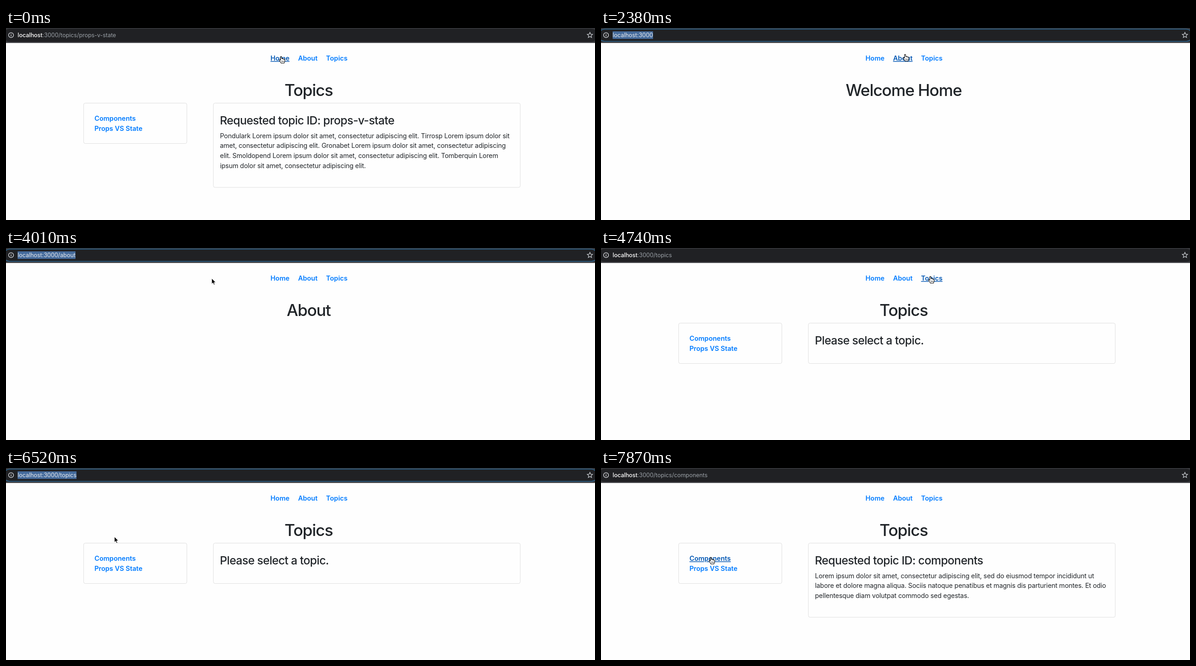
Write an HTML page that moves like this. It is 1280 px wide and 418 px high and loops after 8 s.

```html
<!DOCTYPE html>
<html lang="en">
<head>
<meta charset="utf-8">
<title>Router demo</title>
<style>
  html, body { margin: 0; width: 100%; height: 100%; overflow: hidden; background: #fefefe; }
  svg { display: block; width: 100%; height: 100%; }
  text { font-family: Inter, "Open Sans", sans-serif; font-optical-sizing: none; fill: #212529; white-space: pre; }
  .url { font-size: 12.5px; letter-spacing: -.04px; fill: #9aa0a6; }
  .url .host { font-weight: 500; fill: #fff; }
  .focused .url, .focused .host { font-weight: 400; fill: #e8eaed; }
  .link { font-size: 14.5px; font-weight: 600; fill: #007bff; }
  .link.hover { fill: #0056b3; text-decoration: underline; }
  .title { font-size: 35.2px; font-weight: 500; letter-spacing: -1.1px; text-anchor: middle; }
  .heading { font-size: 24.7px; font-weight: 500; letter-spacing: -.6px; }
  .body { font-size: 14.2px; letter-spacing: -.14px; }
  .card { fill: none; stroke: #dfdfdf; }
</style>
</head>
<body>
<svg id="stage" viewBox="0 0 1280 418" preserveAspectRatio="none"></svg>
<script>
const LOOP = 8000, STEP = 148.3;
const stage = document.getElementById('stage');

const lorem = 'Lorem ipsum dolor sit amet, consectetur adipiscing elit.';
const pages = {
  home: { path: '', title: 'Welcome Home' },
  about: { path: '/about', title: 'About' },
  topics: { path: '/topics', title: 'Topics', heading: 'Please select a topic.', bottom: 251.5 },
  props: {
    path: '/topics/props-v-state', title: 'Topics', heading: 'Requested topic ID: props-v-state', bottom: 347,
    lines: [
      `Pondulark ${lorem} Tirrosp Lorem ipsum dolor sit`,
      `amet, consectetur adipiscing elit. Gronabet Lorem ipsum dolor sit amet, consectetur adipiscing`,
      `elit. Smoldopend ${lorem} Tomberquin Lorem`,
      'ipsum dolor sit amet, consectetur adipiscing elit.'
    ]
  },
  components: {
    path: '/topics/components', title: 'Topics', heading: 'Requested topic ID: components', bottom: 325,
    lines: [
      'Lorem ipsum dolor sit amet, consectetur adipiscing elit, sed do eiusmod tempor incididunt ut',
      'labore et dolore magna aliqua. Sociis natoque penatibus et magnis dis parturient montes. Et odio',
      'pellentesque diam volutpat commodo sed egestas.'
    ]
  }
};

// Step at which each page opens, and the spans with a focused address bar
const visits = [[0, 'props'], [1, 'home'], [18, 'about'], [31, 'topics'], [50, 'components']];
const focusSpans = [[8, 18], [24, 31], [39, 50]];

// Pointer path: step, x, y
const path = [
  [0, 598, 62], [3, 598, 62], [4, 560, 88], [5, 390, 60], [6, 235, 27], [7, 168, 17], [9, 168, 17],
  [10, 185, 45], [11, 300, 95], [13, 560, 92], [15, 655, 64], [16, 661, 57.5], [19, 661, 57.5],
  [20, 630, 52], [21, 510, 48], [22, 330, 28], [23, 200, 16], [25, 200, 16], [26, 310, 50], [27, 447, 66],
  [28, 590, 66], [29, 690, 64], [30, 716, 62], [34, 716, 62], [35, 650, 58], [36, 430, 32], [37, 245.5, 3.5],
  [38, 232, 14], [41, 234, 15], [42, 234, 18], [43, 233, 80], [44, 235.5, 149.5], [45, 238, 180],
  [46, 239, 193], [53, 239, 194.5]
];

const links = [
  { label: 'Home', x: 574.8, y: 71, w: 42 },
  { label: 'About', x: 634.7, y: 71, w: 43 },
  { label: 'Topics', x: 695.6, y: 71, w: 46 },
  { label: 'Components', x: 192.3, y: 202.3, w: 90, side: true },
  { label: 'Props VS State', x: 192.2, y: 224, w: 107, side: true }
];

const text = (cls, x, y, content) => `<text class="${cls}" x="${x}" y="${y}">${content}</text>`;
const card = (x, right, bottom) =>
  `<rect class="card" x="${x}" y="163.5" width="${right - x}" height="${bottom - 163.5}" rx="3.6"/>`;

function pointerAt(step) {
  const i = path.findIndex(p => p[0] >= step);
  if (i < 1) return path[i < 0 ? path.length - 1 : 0].slice(1);
  const [a, ax, ay] = path[i - 1], [b, bx, by] = path[i];
  const k = (step - a) / (b - a);
  return [ax + (bx - ax) * k, ay + (by - ay) * k];
}

function starPoints(cx, cy, r) {
  return Array.from({ length: 10 }, (_, i) => {
    const radius = i % 2 ? r * .45 : r, angle = (i * 36 - 90) * Math.PI / 180;
    return `${(cx + radius * Math.cos(angle)).toFixed(2)},${(cy + radius * Math.sin(angle)).toFixed(2)}`;
  }).join(' ');
}

const beam = 'M-3.6-6.8C-1-6.8 0-6 0-4.8V4.8C0 6-1 6.8-3.6 6.8M3.6-6.8C1-6.8 0-6 0-4.8M0 4.8C0 6 1 6.8 3.6 6.8M-1.8 2.6H1.8';
const cursors = {
  arrow: `<path d="M0 0V12.4L2.9 9.8 4.8 14.3 6.9 13.4 5 9.1H8.8Z" fill="#000" stroke="#fff"/>`,
  beam: `<path d="${beam}" fill="none" stroke="#eee" stroke-width="2.6"/><path d="${beam}" fill="none" stroke="#111" stroke-width="1"/>`,
  hand: `<path d="M-1.4 1.2C-1.4-.6 1-.6 1.1 1.2L1.2 5C1.6 4 3.4 4.2 3.6 5.4 4.2 4.6 5.8 4.9 5.9 6.1
    6.8 5.6 8 6 8 7.4V9.5C8 12 6.6 12.4 6.5 14.5H-.2C-.6 12.8-2.3 11.5-4 8.8-5 7.3-3 6-1.4 8Z"
    fill="#fff" stroke="#000" stroke-width="1.1"/><path d="M1.2 9.3V12M3.2 9.3V12M5.2 9.3V12" stroke="#000" stroke-width=".8"/>`
};

function addressBar(page, focused, hovered) {
  const fill = hovered && !focused ? '#292a2d' : '#202124';
  return `<rect width="1280" height="32.5" fill="#35363a"/>
    <rect x="-5" y="2.5" width="1290" height="26.5" rx="13" fill="${fill}" stroke="${focused ? '#2b648f' : fill}" stroke-width="1.6"/>
    <circle cx="11" cy="15.5" r="5.4" fill="none" stroke="#dadce0" stroke-width="1.3"/>
    <path d="M11 14.6V18.3M11 12.2V13.5" stroke="#dadce0" stroke-width="1.4"/>
    <polygon points="${starPoints(1269, 15.6, 6.2)}" fill="none" stroke="#c4c7cb" stroke-width="1.2"/>
    <g class="${focused ? 'focused' : ''}">
      ${focused ? '<rect id="selection" x="25.3" y="7.3" height="16.5" fill="#456b9c"/>' : ''}
      <text id="url" class="url" x="25.3" y="20"><tspan class="host">localhost</tspan>:3000${page.path}</text>
    </g>`;
}

function pageBody(page, x, y) {
  let hot = false;
  const visible = links.filter(l => page.heading || !l.side).map(l => {
    const over = x >= l.x && x <= l.x + l.w && y >= l.y - 16 && y <= l.y + 5.5;
    hot = hot || over;
    return text(over ? 'link hover' : 'link', l.x, l.y, l.label);
  }).join('');
  let markup = visible + text('title', 657.7, 148, page.title);
  if (page.heading) {
    markup += card(168.7, 393, 251.5) + card(450.7, 1117.5, page.bottom) + text('heading', 464.8, 210.3, page.heading);
    markup += (page.lines || []).map((line, i) => text('body', 465, 239.5 + i * 21.8, line)).join('');
  }
  return { markup, hot };
}

function render(step) {
  const page = pages[visits.filter(v => v[0] <= step).pop()[1]];
  const focused = focusSpans.some(([a, b]) => step >= a && step < b);
  const [x, y] = pointerAt(step);
  const inBar = y >= 5 && y < 30;
  const { markup, hot } = pageBody(page, x, y);
  const cursor = cursors[hot ? 'hand' : inBar ? 'beam' : 'arrow'];
  stage.innerHTML = '<rect width="1280" height="418" fill="#fefefe"/>' + addressBar(page, focused, inBar) +
    markup + `<g transform="translate(${x} ${y})">${cursor}</g>`;
  if (focused) {
    const width = document.getElementById('url').getComputedTextLength();
    document.getElementById('selection').setAttribute('width', width);
  }
}

let shown = -1;
const start = performance.now();
function tick() {
  const step = Math.floor(((performance.now() - start) % LOOP + 6) / STEP);
  if (step !== shown) render(shown = step);
  requestAnimationFrame(tick);
}
tick();
</script>
</body>
</html>
```
